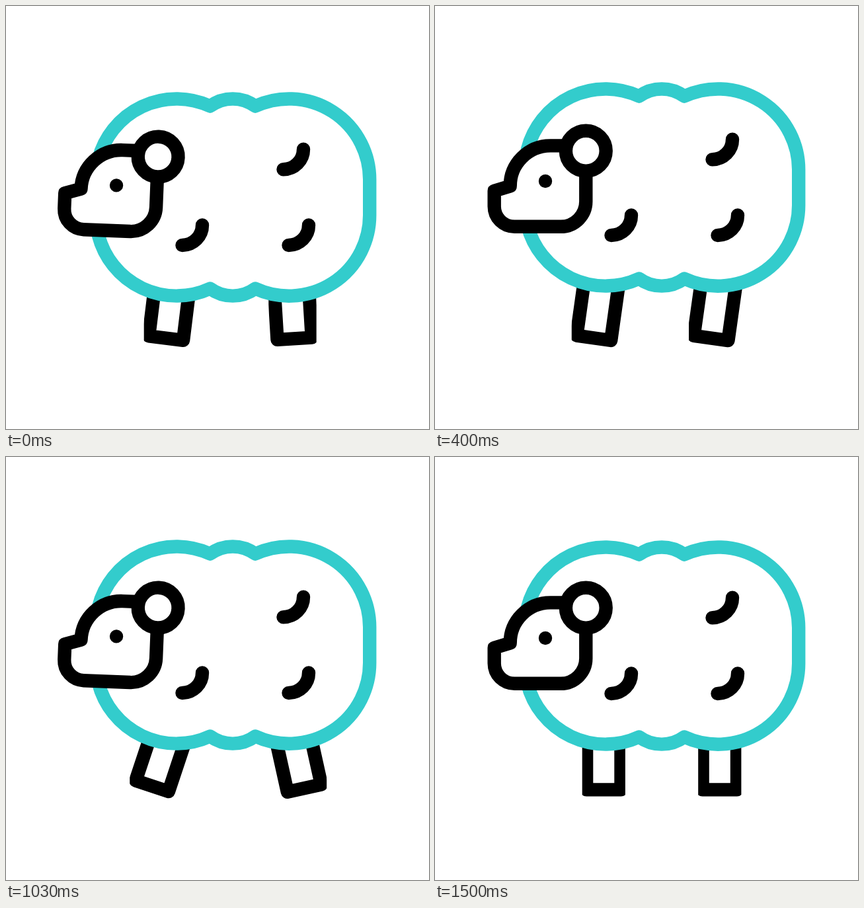
An HTML page with a canvas that plays this animation: 640 px wide and 640 px high, repeating every 1670 ms.

```html
<!DOCTYPE html>
<html lang="en">
<head>
<meta charset="utf-8">
<title>Walking sheep</title>
<style>
  html, body { margin: 0; width: 100%; height: 100%; overflow: hidden; background: #fff; }
  canvas { display: block; }
</style>
</head>
<body>
<canvas id="stage" width="640" height="640"></canvas>
<script>
const ctx = document.getElementById('stage').getContext('2d');
const LOOP = 1670, STROKE = 20.4, TEAL = '#33cccc', BLACK = '#000';

// Pose keys, in steps of 1/30 s; angles in degrees, offsets in pixels
const keyTimes = [0, 4, 8, 12, 16, 19.5, 23, 27, 31, 36, 45];
const keys = {
  bob:      [4, 19, 14, -11, 1.3, 18, 6, -12, -1, 17, 0],
  frontLeg: [7, 37, 22, 8, 33.8, 37, 21.5, 6, 18.4, 37, 0],
  backLeg:  [-3.5, -25, -2, 8, -9.5, -25, -3.5, 8, -12.5, -32.5, 0],
  nod:      [2.3, 11.5, 5, 0, 2.3, 11.3, 5.8, 0, 2.3, 11.3, 0],
  lift:     [0, 0, -3.7, -9, 0, 0, -7.3, -10, 0, 0, 0]
};

const bodyPath = new Path2D(`M140 343.6 A122 122 0 0 0 308.8 423.5 A58 58 0 0 0 377.2 423.5
  A122 122 0 0 0 550.2 312.6 V258.5 A122 122 0 0 0 377.2 147.6 A58 58 0 0 0 308.8 147.6
  A122 122 0 0 0 140 227.5 Z`);
const headPath = new Path2D(`M204 220.4 H174.5 A61 61 0 0 0 113.7 281.5 L89.7 288.8 V312.3
  A30.5 30.5 0 0 0 120.2 342.8 H190.3 A38 38 0 0 0 228.3 304.8 V258`);
const curls = [[450, 212.7], [297, 327.5], [458, 327.5]];

// Smooth curve through the keys
function sample(values, time) {
  const last = keyTimes.length - 1;
  if (time >= keyTimes[last]) return values[last];
  let i = 0;
  while (time >= keyTimes[i + 1]) i++;
  const slope = n => {
    if (n === last) return 0;
    const a = Math.max(n - 1, 0), b = n + 1;
    return (values[b] - values[a]) / (keyTimes[b] - keyTimes[a]);
  };
  const span = keyTimes[i + 1] - keyTimes[i], u = (time - keyTimes[i]) / span;
  const u2 = u * u, u3 = u2 * u;
  return values[i] * (2 * u3 - 3 * u2 + 1) + values[i + 1] * (3 * u2 - 2 * u3)
    + span * (slope(i) * (u3 - 2 * u2 + u) + slope(i + 1) * (u3 - u2));
}

function paint(path, color, fill = '#fff') {
  ctx.strokeStyle = color;
  if (fill) {
    ctx.fillStyle = fill;
    ctx.fill(path);
  }
  ctx.stroke(path);
}

function disc(x, y, r) {
  const path = new Path2D();
  path.arc(x, y, r, 0, 7);
  return path;
}

// The sides of a leg are trimmed by an upright box around its corners
function drawLeg(x, y, degrees) {
  const angle = degrees * Math.PI / 180, cos = Math.cos(angle), sin = Math.sin(angle);
  const corners = [[-26.2, 400], [-26.2, 503.4], [26.2, 503.4], [26.2, 400]]
    .map(([dx, cy]) => [x + dx * cos - (cy - y) * sin, y + dx * sin + (cy - y) * cos]);
  const xs = corners.map(c => c[0]);
  const margin = 6.4 + 0.14 * Math.abs(degrees);
  const left = Math.min(...xs) - margin, right = Math.max(...xs) + margin;
  const leg = new Path2D();
  corners.forEach(c => leg.lineTo(...c));
  leg.closePath();
  ctx.save();
  ctx.beginPath();
  ctx.rect(left, 0, right - left, 640);
  ctx.clip();
  paint(leg, BLACK);
  ctx.restore();
}

function drawBody(bob) {
  ctx.save();
  ctx.translate(0, bob);
  paint(bodyPath, TEAL);
  for (const [x, y] of curls) {
    const curl = new Path2D();
    curl.arc(x - 30.5, y, 30.5, 0, Math.PI / 2);
    paint(curl, BLACK, null);
  }
  ctx.restore();
}

function drawHead(nod, lift) {
  ctx.save();
  ctx.translate(232.5, 274 + lift);
  ctx.rotate(nod * Math.PI / 180);
  ctx.translate(-232.5, -274);
  paint(headPath, BLACK);
  paint(disc(228.3, 228.2, 30.4), BLACK);
  ctx.fillStyle = BLACK;
  ctx.fill(disc(167, 274, 10.2));
  ctx.restore();
}

function draw(ms) {
  const step = Math.floor(ms * 0.03 + 0.15);
  const pose = name => sample(keys[name], step);
  ctx.clearRect(0, 0, 640, 640);
  ctx.lineWidth = STROKE;
  ctx.lineCap = ctx.lineJoin = 'round';
  drawLeg(255.3, 395, pose('frontLeg'));
  drawLeg(430.8, 408, pose('backLeg'));
  drawBody(pose('bob'));
  drawHead(pose('nod'), pose('lift'));
}

const start = performance.now();
function tick() {
  draw((performance.now() - start) % LOOP);
  requestAnimationFrame(tick);
}
tick();
</script>
</body>
</html>
```
